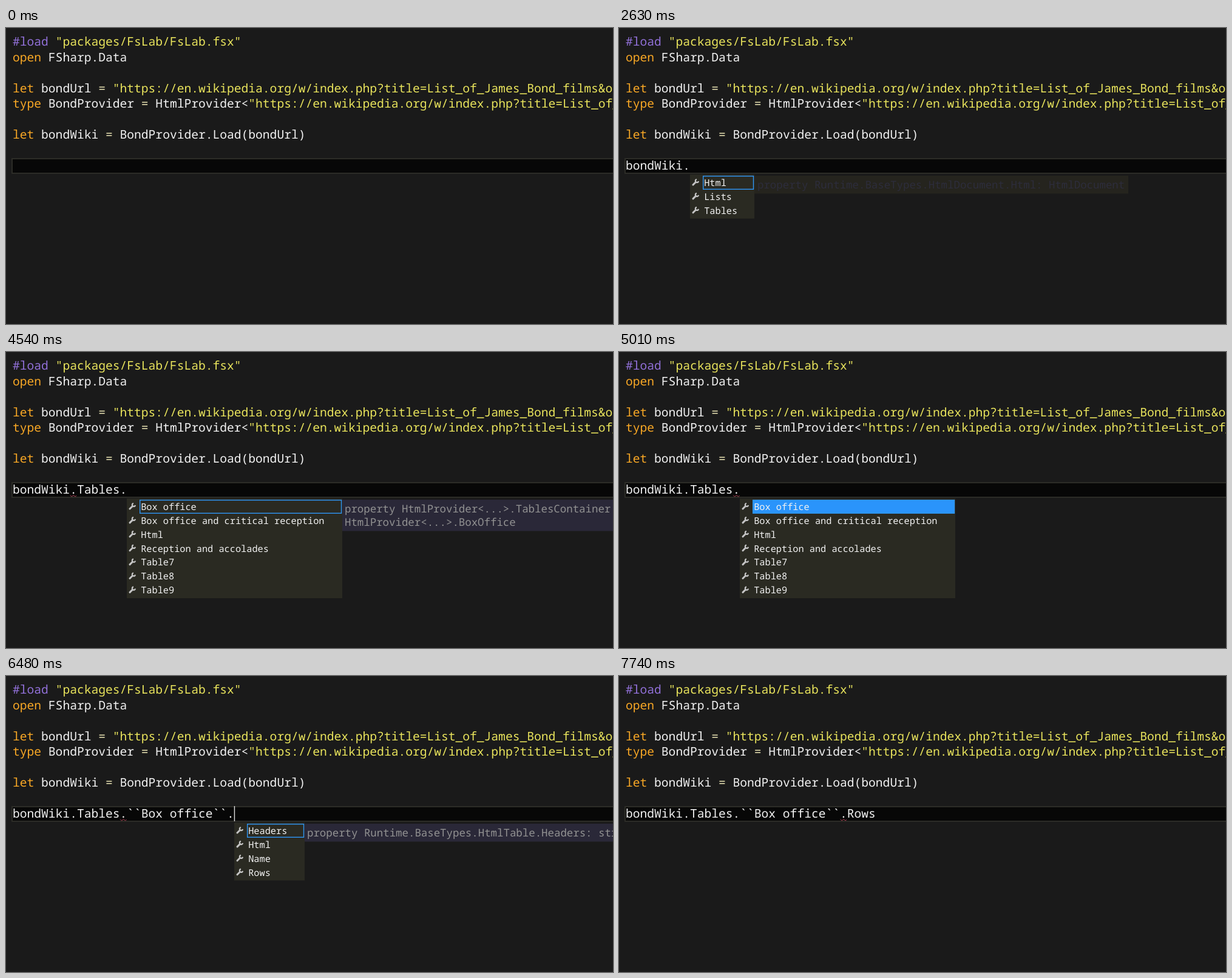
These frames come from a looping animation (1000x487 px, 8000 ms). An HTML page:

```html
<!DOCTYPE html>
<html lang="en">
<head>
<meta charset="utf-8">
<title>Code completion</title>
<style>
  html, body { margin: 0; width: 100%; height: 100%; overflow: hidden; background: #1a1a1a; }
  svg { display: block; width: 1000px; height: 487px; }
  text {
    font-family: "Noto Sans Mono", "DejaVu Sans Mono", monospace;
    font-size: 19.62px; fill: #f2f2f2;
    white-space: pre; text-rendering: geometricPrecision;
  }
  .key { fill: #f9a825; }
  .dir { fill: #9170d8; }
  .str { fill: #e9e45c; }
  .op { fill: #e4deb0; }
  .item { font-size: 15.28px; }
  .tip { font-size: 17.4px; }
  .wrench { fill: none; stroke: #c4c4c4; }
</style>
</head>
<body>
<svg id="stage" viewBox="0 0 1000 487" xmlns="http://www.w3.org/2000/svg">
  <rect width="1000" height="487" fill="#1a1a1a"/>
  <rect x="10" y="215" width="1000" height="24" fill="#070707" stroke="#2c2c27" stroke-width="2"/>
</svg>
<script>
const LOOP = 8000, LEFT = 11, COL = 11.772, LINE = 25.5, BASE = 29, ROW = 22.9;
const stage = document.getElementById("stage");

function add(parent, tag, attrs, text) {
  const el = document.createElementNS("http://www.w3.org/2000/svg", tag);
  for (const k in attrs) el.setAttribute(k, attrs[k]);
  if (text) el.textContent = text;
  parent.appendChild(el);
  return el;
}
const show = (el, on) => { el.style.display = on ? "" : "none"; };
const colX = n => LEFT + n * COL;

// Latest value in a list of [time, value] pairs
function at(steps, t) {
  let value = steps[0][1];
  for (const [time, v] of steps) if (time <= t) value = v;
  return value;
}

// Linear interpolation between [time, value] pairs
function ramp(keys, t) {
  for (let i = 1; i < keys.length; i++) {
    const [t0, a] = keys[i - 1], [t1, b] = keys[i];
    if (t < t1) return a + (b - a) * (t - t0) / (t1 - t0);
  }
  return 0;
}
const mix = (a, b, k) => `rgb(${a.map((v, i) => Math.round(v + (b[i] - v) * k))})`;

const url = '"https://en.wikipedia.org/w/index.php?title=List_of_James_Bond_films&ol';
const code = [
  [["dir", "#load "], ["str", '"packages/FsLab/FsLab.fsx"']],
  [["key", "open "], ["", "FSharp.Data"]],
  [],
  [["key", "let "], ["", "bondUrl "], ["op", "= "], ["str", url]],
  [["key", "type "], ["", "BondProvider "], ["op", "= "], ["", "HtmlProvider<"], ["str", url]],
  [],
  [["key", "let "], ["", "bondWiki "], ["op", "= "], ["", "BondProvider.Load(bondUrl)"]]
];
code.forEach((parts, i) => {
  const line = add(stage, "text", { x: LEFT, y: BASE + i * LINE });
  for (const [cls, str] of parts) add(line, "tspan", { class: cls }, str);
});

const typed = add(stage, "text", { x: LEFT, y: BASE + 8 * LINE });
const squiggle = add(stage, "path", {
  d: "M.5 235.5 l2.5 2.5 3 -2.5 3 2.5 2 -2", fill: "none", stroke: "#b04458", "stroke-width": 1
});
const caret = add(stage, "rect", { y: 214, width: 1.4, height: 25, fill: "#dcdcdc" });

// sel holds [time, [row, filled]]; tip.fade runs from appearance to removal
const popups = [
  {
    x: 117, w: 106, from: 1970, to: 3660,
    items: ["Html", "Lists", "Tables"],
    sel: [[0, [0, false]], [2700, [0, true]], [2770, [1, true]], [2850, [2, true]]],
    tip: {
      x: 223, w: 616, pad: 5,
      lines: ["property Runtime.BaseTypes.HtmlDocument.Html: HtmlDocument"],
      fade: [[2630, 0], [2720, 0.3], [2850, 0]]
    }
  },
  {
    x: 199, w: 355, from: 3950, to: 5110,
    items: ["Box office", "Box office and critical reception", "Html",
      "Reception and accolades", "Table7", "Table8", "Table9"],
    sel: [[0, [0, false]], [4650, [0, true]]],
    tip: {
      x: 554, w: 446, pad: 4,
      lines: ["property HtmlProvider<...>.TablesContainer", "HtmlProvider<...>.BoxOffice"],
      fade: [[4350, 0], [4540, 1], [4600, 1], [4810, 0]]
    }
  },
  {
    x: 376, w: 116, from: 5790, to: 7240,
    items: ["Headers", "Html", "Name", "Rows"],
    sel: [[0, [0, false]], [6600, [0, true]], [6720, [1, true]], [6880, [3, true]]],
    tip: {
      x: 492, w: 508, pad: 4,
      lines: ["property Runtime.BaseTypes.HtmlTable.Headers: string"],
      fade: [[6250, 0], [6450, 0], [6480, 1], [6560, 1], [6720, 0]]
    }
  }
];

function buildPopup(p) {
  p.el = add(stage, "g", {});
  add(p.el, "rect", { x: p.x, y: 241, width: p.w, height: p.items.length * ROW + 3.8, fill: "#2a2a22" });
  p.mark = add(p.el, "rect", { x: p.x + 21.7, width: p.w - 23.2, height: 21.6, stroke: "#2f96f5", "stroke-width": 1.4 });
  p.items.forEach((name, i) => {
    const y = 254 + i * ROW;
    const icon = add(p.el, "g", { class: "wrench", transform: `translate(${p.x + 9} ${y})` });
    add(icon, "path", { d: "M-4 4 L.5 -.5", "stroke-width": 3, "stroke-linecap": "round" });
    add(icon, "path", { d: "M2 -5 A2.6 2.6 0 1 0 5 -2", "stroke-width": 2.2 });
    add(p.el, "text", { class: "item", x: p.x + 23.2, y: y + 5.8 }, name);
  });

  const tip = p.tip;
  tip.el = add(stage, "g", {});
  tip.box = add(tip.el, "rect", { x: tip.x, y: 243, width: tip.w, height: 7.5 + 22 * tip.lines.length });
  tip.rows = tip.lines.map((str, i) =>
    add(tip.el, "text", { class: "tip", x: tip.x + tip.pad, y: 264 + 22 * i }, str));
}
popups.forEach(buildPopup);

const full = "bondWiki.Tables.``Box office``.Rows";
const typing = [
  [0, 0], [160, 1], [270, 2], [390, 3], [650, 4], [1010, 5], [1140, 6], [1340, 7], [1480, 8],
  [1740, 9], [3660, 15], [3800, 16], [5110, 30], [5530, 31], [7540, 35]
];
const squiggleCol = [[0, -1], [3080, 8], [5010, 15], [6660, 30]];
// Times at which the caret toggles, starting hidden
const blinks = [160, 1540, 1740, 2000, 2850, 3140, 3370, 3660, 3950, 4350,
  4810, 5010, 5110, 5370, 5530, 5820, 6450, 6880, 7340, 7740];

function drawPopup(p, t) {
  const open = t >= p.from && t < p.to;
  show(p.el, open);
  if (open) {
    const [row, filled] = at(p.sel, t);
    p.mark.setAttribute("y", 243.7 + row * ROW);
    p.mark.setAttribute("fill", filled ? "#2a94fb" : "none");
  }
  const { el, box, rows, fade } = p.tip;
  const visible = t >= fade[0][0] && t < fade[fade.length - 1][0];
  show(el, visible);
  if (visible) {
    const k = ramp(fade, t);
    box.style.fill = mix([37, 36, 30], [42, 40, 56], k);
    for (const r of rows) r.style.fill = mix([45, 45, 60], [146, 146, 146], k);
  }
}

function draw(t) {
  const n = at(typing, t);
  typed.textContent = full.slice(0, n);
  show(caret, blinks.filter(b => b <= t).length % 2);
  caret.setAttribute("x", colX(n) - 0.2);
  const c = at(squiggleCol, t);
  show(squiggle, c >= 0);
  squiggle.setAttribute("transform", `translate(${colX(c)} 0)`);
  popups.forEach(p => drawPopup(p, t));
}

const start = performance.now();
function tick() {
  draw((performance.now() - start) % LOOP);
  requestAnimationFrame(tick);
}
tick();
</script>
</body>
</html>
```
